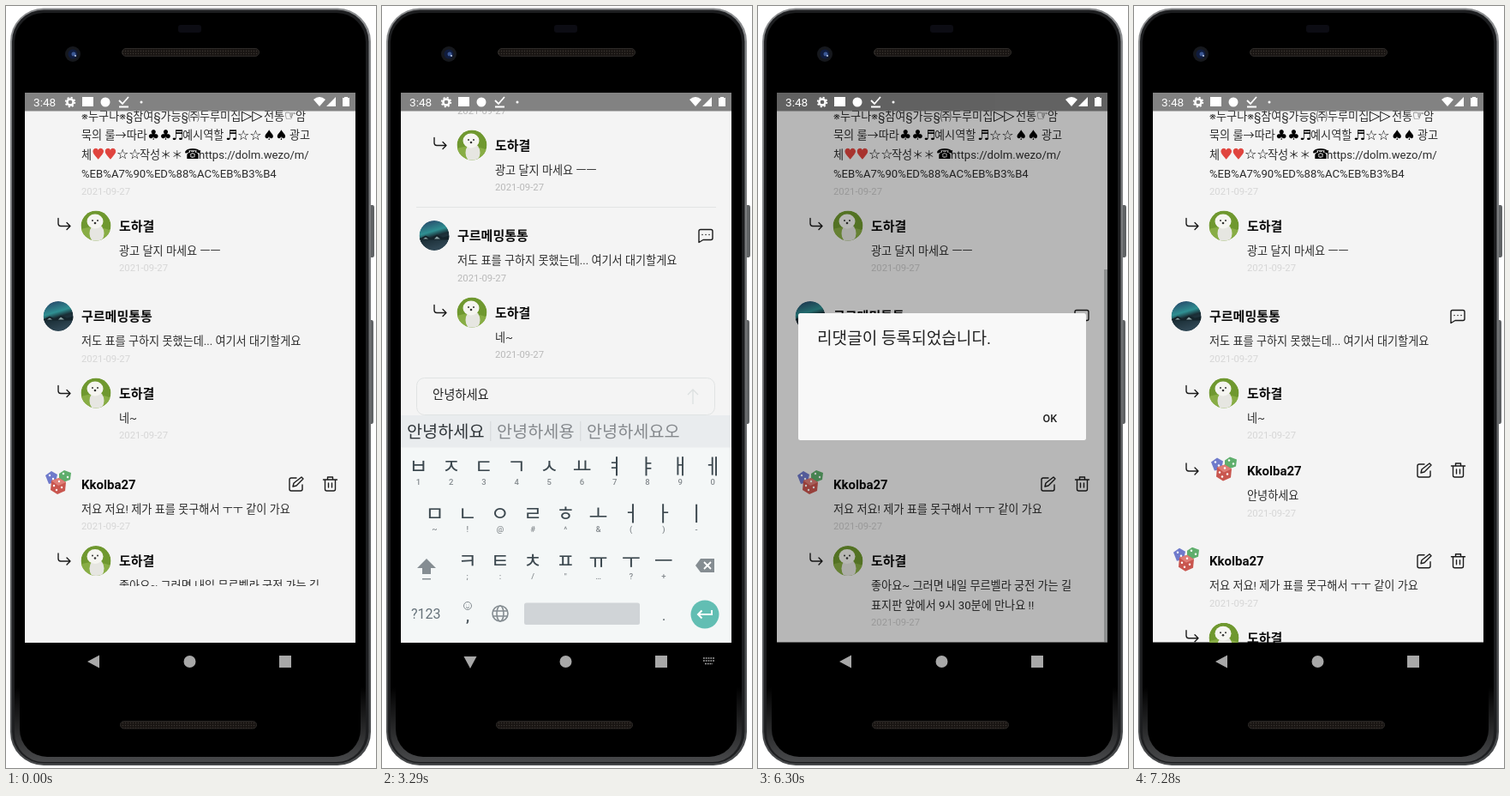
Animation, 432 px wide and 888 px high, one loop 7.49 s. Source, as an HTML page:

```html
<!DOCTYPE html>
<html lang="ko">
<head>
<meta charset="utf-8">
<title>Comment reply</title>
<style>
html, body { margin: 0; width: 100%; height: 100%; overflow: hidden; background: #fff; }
svg { display: block; width: 432px; height: 888px; font-family: Roboto, "Noto Sans CJK KR", "Noto Sans CJK", sans-serif; }
text { white-space: pre; }
.name { font-size: 15px; font-weight: 700; fill: #0b0b0b; }
.body { font-size: 13.15px; fill: #2c2c2c; }
.sym { font-size: 16px; font-family: "DejaVu Sans", "Noto Sans CJK KR", sans-serif; }
.date { font-size: 11.3px; fill: #b9b9b9; }
.line { stroke: #e2e4e4; }
.icon { fill: none; stroke: #1b1b1b; stroke-width: 1.4; stroke-linecap: round; stroke-linejoin: round; }
.bar { fill: #bcbebe; }
.key { font-size: 24px; fill: #3c484f; text-anchor: middle; }
.hint { font-size: 9.5px; font-weight: 500; fill: #858b8f; text-anchor: middle; }
.word { font-size: 19.7px; fill: #85898d; }
.typed { font-size: 14.3px; fill: #222; }
</style>
</head>
<body>
<svg viewBox="0 0 432 888">
  <defs>
    <linearGradient id="rim" x2="0" y2="1"><stop stop-color="#8b8d8f"/><stop offset=".5" stop-color="#6c6e70"/><stop offset="1" stop-color="#46484a"/></linearGradient>
    <linearGradient id="gloss" x2="0" y2="1"><stop offset=".9" stop-color="#000"/><stop offset="1" stop-color="#48494b"/></linearGradient>
    <linearGradient id="sky" x2=".3" y2="1"><stop stop-color="#263a62"/><stop offset=".45" stop-color="#2f9092"/><stop offset=".62" stop-color="#1a2d35"/><stop offset="1" stop-color="#2f4653"/></linearGradient>
    <clipPath id="screen"><path d="M22 101H408V741.500H22z"/></clipPath>
    <clipPath id="round"><circle r="17.5"/></clipPath>
    <pattern id="mesh" width="3" height="3" patternUnits="userSpaceOnUse"><rect width="3" height="3" fill="#191513"/><circle cx="1.5" cy="1.5" r=".7" fill="#3b3632"/></pattern>
    <g id="dog" clip-path="url(#round)">
      <circle r="17.5" fill="#6f982f"/><path d="M-18 4Q0-2 18 6V18H-18z" fill="#88ad45"/>
      <ellipse cx="1" cy="9" rx="8.5" ry="11" fill="#e6e6e1"/><ellipse cx="-1" cy="-5" rx="9.5" ry="8.5" fill="#f5f5f0"/>
      <g fill="#333"><circle cx="-4" cy="-6" r="1"/><circle cx="2" cy="-6" r="1"/><circle cx="-1" cy="-3" r="1.3"/></g>
    </g>
    <g id="lake" clip-path="url(#round)">
      <circle r="17.5" fill="url(#sky)"/><path d="M-18 4L-10 0-4 3 3-1 10 2 18 0V5H-18z" fill="#14242b"/>
      <path d="M-13 4l3-2 3 2zM0 4l3-3 4 3z" fill="#8fa5a7"/>
    </g>
    <g id="dice">
      <path d="M-15-10l7-5 7 4-2 9-8 2z" fill="#6f7acb"/><path d="M1-12l6-4 8 3-1 8-8 3-5-3z" fill="#5fae6c"/>
      <path d="M-8-4l9-3 8 5-1 10-9 4-8-5z" fill="#c9564f"/><path d="M-8-4l9-3 8 5-9 4z" fill="#de7e77"/>
      <g fill="#fff"><circle cx="-10" cy="-10" r="1.2"/><circle cx="-6" cy="-6" r="1.2"/><circle cx="6" cy="-12" r="1.2"/><circle cx="11" cy="-8" r="1.2"/><circle cx="1" cy="-3" r="1.2"/><circle cx="-5" cy="2" r="1.2"/><circle cx="-2" cy="7" r="1.2"/><circle cx="4" cy="4" r="1.2"/></g>
    </g>
    <path id="turn" class="icon" d="M1-8.500V-2.500Q1 .5 4 .5H15M11-3.500L15 .5 11 4.500"/>
    <path id="chat" class="icon" d="M-6-7H6Q8-7 8-5V3Q8 5 6 5H-3L-8 8V-5Q-8-7-6-7zM-4-1h.1M0-1h.1M4-1h.1"/>
    <path id="edit" class="icon" d="M0-7H-6Q-8-7-8-5V6Q-8 8-6 8H5Q7 8 7 6V1M6-8L8-6 0 2-4 3-3-1z"/>
    <path id="trash" class="icon" d="M-8-5H8M-3-5V-8H3V-5M-6-5V6Q-6 8-4 8H4Q6 8 6 6V-5M-2-1V4M2-1V4"/>
  </defs>

  <path d="M424 232h4q2 0 2 3v55q0 3-2 3h-4zM424 366h3q2 0 2 3v115q0 3-2 3h-3z" fill="#606365"/>
  <rect x="5" y="2.500" width="421" height="882.500" rx="39" fill="url(#rim)"/>
  <rect x="7" y="4.500" width="416.500" height="878" rx="37" fill="#1d1e20"/>
  <rect x="10" y="8" width="410" height="873" rx="34" fill="url(#gloss)"/>
  <rect x="16" y="700" width="398" height="175" rx="32"/>
  <rect x="201" y="22" width="27" height="9" rx="3" fill="#0c0c13"/>
  <circle cx="78" cy="56" r="9" fill="#16181d"/><circle cx="78" cy="56" r="5.5" fill="#101c3d"/><circle cx="79" cy="56" r="2.5" fill="#3b5793"/><circle cx="81" cy="58" r="1" fill="#c3d0ea"/>
  <rect x="135.500" y="49.500" width="160" height="9" rx="4.500" fill="url(#mesh)" stroke="#2c2927"/>
  <rect x="133.500" y="833.500" width="159" height="8.500" rx="4.200" fill="url(#mesh)" stroke="#2c2927"/>

  <g clip-path="url(#screen)">
    <path d="M22 101H408V742H22z" fill="#f4f4f4"/>
    <g id="list"></g>
    <g id="bars"><rect class="bar" x="404" y="255" width="4" height="131"/><rect class="bar" x="404" y="307" width="4" height="434"/><rect class="bar" x="404" y="290" width="4" height="394"/></g>
    <g id="footer">
      <path d="M22 412H408V742H22z" fill="#f4f4f4"/>
      <g id="field">
        <rect x="40.500" y="433.500" width="348" height="43" rx="9" fill="none" stroke="#e0e3e3"/>
        <path d="M363 464V447M357 453L363 447 369 453" fill="none" stroke="#dce0e0" stroke-width="1.300"/>
        <text id="hold" x="59" y="459" font-size="14.100" fill="#c3c7c8">Add Comment...</text>
        <g id="typed"></g>
      </g>
    </g>
    <path d="M22 101H408V122.500H22z" fill="#828282"/>
    <path id="dim" d="M22 101H408V742H22z"/>
    <g fill="#fff">
      <text x="32" y="117" font-size="13.600">3:48</text>
      <circle cx="75" cy="112" r="3.600" fill="none" stroke="#fff" stroke-width="2.500"/><circle cx="75" cy="112" r="5.400" fill="none" stroke="#fff" stroke-width="1.600" stroke-dasharray="2.100 2.141"/>
      <rect x="89" y="106" width="13" height="11"/><circle cx="116" cy="112" r="5.500"/>
      <path d="M132 110l4 4 7-8M132 117.500h11" fill="none" stroke="#fff" stroke-width="1.800"/><circle cx="158" cy="112" r="1.500"/>
      <path d="M359 109q7-6 14 0l-7 8zM385 106v11h-11zM393 107h2v-1h4v1h2v10h-8z"/>
    </g>
    <g id="dialog">
      <rect x="47" y="358" width="336" height="148" rx="2.500" fill="#f8f8f8"/>
      <text x="69" y="394" font-size="19.100" fill="#222">리댓글이 등록되었습니다.</text>
      <text x="332.500" y="484.500" font-size="12.500" font-weight="500" fill="#222">OK</text>
    </g>
  </g>

  <g id="board">
    <path d="M22 477H408V741H22z" fill="#f4f7f7"/>
    <g id="tabs">
      <path d="M102 477H408V514H102z" fill="#e9ecee"/>
      <text class="key" x="62" y="500" style="font-size:21px">ㅎ</text><path d="M62 501l2 5" stroke="#3c484f" stroke-width="2"/>
      <text x="131" y="503" font-size="20" fill="#78838a">En</text>
      <rect x="376.500" y="488" width="5" height="9" rx="2.500" fill="#858d92"/><path d="M373.500 495q0 5 5.500 5t5.500-5M379 500v4" fill="none" stroke="#858d92" stroke-width="1.500"/>
    </g>
    <g id="words"></g>
    <g id="keys"></g>
    <g fill="#858d92">
      <path d="M52 644L63 655H57V662H47V655H41zM47 667h10v1.500h-10z"/>
      <path d="M366 652l6-8h16v16h-16z"/><path d="M376 648l8 8m0-8l-8 8" stroke="#fff" stroke-width="1.800"/>
      <text x="34" y="714" font-size="16" fill="#66727a">?123</text>
      <circle cx="100" cy="699" r="4.500" fill="none" stroke="#858d92"/><path d="M98 700.500q2 2 4 0M98 698h.6M101.500 698h.6" fill="none" stroke="#858d92"/>
      <text x="98" y="717" font-size="17" font-weight="700" fill="#4b565c">,</text>
      <g fill="none" stroke="#858d92" stroke-width="1.600"><circle cx="138" cy="708" r="9"/><ellipse cx="138" cy="708" rx="4" ry="9"/><path d="M129.500 705h17M129.500 711h17"/></g>
      <rect x="166" y="695.500" width="135" height="25.500" rx="2.500" fill="#d0d4d7"/>
      <text x="327" y="716" font-size="16" fill="#4b565c">.</text>
      <circle cx="377" cy="709" r="16.500" fill="#62beb3"/><path d="M385 704v5h-16m4.500-4.500l-4.500 4.500 4.500 4.500" fill="none" stroke="#fff" stroke-width="2"/>
    </g>
  </g>
  <g fill="#a8a8a8">
    <g transform="translate(103 764)"><path id="back" d="M-8 0L6-7.500V7.500z"/></g>
    <circle cx="214.500" cy="764" r="7"/><rect x="319" y="757" width="14" height="14"/>
    <path id="kbd" d="M375 760h13M375 763h13M377 766.500h9" stroke="#a8a8a8" stroke-width="1.600" stroke-dasharray="1.800 1"/>
  </g>
</svg>
<script>
const LOOP = 7490;
const $ = id => document.getElementById(id);

// Holds each value until the next [ms, value] step.
function track(el, prop, steps) {
  const frames = steps.map(([t, v]) => ({ offset: t / LOOP, [prop]: v, easing: 'steps(1)' }));
  frames.push({ offset: 1, [prop]: steps.at(-1)[1] });
  el.animate(frames, { duration: LOOP, iterations: Infinity });
}
const fade = (el, ...steps) => track(el, 'opacity', [[0, 0], ...steps]);
const slide = (el, ...steps) =>
  track(el, 'transform', [[0, 0], ...steps].map(([t, y]) => [t, `translate(0px, ${y}px)`]));

const text = (cls, x, y, s) => `<text class="${cls}" x="${x}" y="${y}">${s}</text>`;
const use = (id, x, y) => `<use href="#${id}" x="${x}" y="${y}"/>`;
const line = y => `<path class="line" d="M40 ${y}H390"/>`;
const tools = y => use('edit', 339, y) + use('trash', 378.5, y);

function row(y, name, pic, lines, reply = true) {
  const x = reply ? 132 : 88;
  return (reply ? use('turn', 60, y) : '') + use(pic, reply ? 105 : 61, y) +
    text('name', x, y + 5.5, name) +
    lines.map((s, i) => text('body', x, y + 33.5 + i * 22.7, s)).join('') +
    text('date', x, y + 53 + (lines.length - 1) * 22.7, '2021-09-27');
}

const host = '도하결', guest = '구르메밍통통', me = 'Kkolba27';
const bits = (y, parts) => parts.map(([x, s, sym]) => text(sym ? 'sym' : 'body', x, y + (sym ? .5 : 0), s)).join('');

$('list').innerHTML =
  bits(132.5, [[88, '※누구나※§참여§가능§㈜두루미집'], [275, '▷▷', 1], [301, '전통'], [325, '☞', 1], [338, '암']]) +
  bits(155, [[88, '묵의 룰→따라'], [165, '♣♣', 1], [193, '♬', 1], [206, '예시역할'], [256, '♬', 1], [270, '☆☆', 1], [300, '♠♠', 1], [331, '광고']]) +
  bits(177.5, [[88, '체'], [129, '☆☆', 1], [156, '작성'], [180, '＊＊'], [208, '☎', 1], [225, 'https://dolm.wezo/m/']]) +
  '<g fill="#e0443e" stroke="#e0443e">' + text('sym', 100.5, 178, '♥♥') + '</g>' +
  text('body', 88, 200, '%EB%A7%90%ED%88%AC%EB%B3%B4') +
  text('date', 88, 219.5, '2021-09-27') +
  row(256, host, 'dog', ['광고 달지 마세요 ㅡㅡ']) + line(328.5) +
  row(361.5, guest, 'lake', ['저도 표를 구하지 못했는데... 여기서 대기할게요'], false) +
  `<g id="ask">${use('chat', 378, 361.5)}</g>` +
  row(451, host, 'dog', ['네~']) +
  `<g id="fresh">${row(541.5, me, 'dice', ['안녕하세요'])}${tools(541)}</g>` +
  `<g id="tail">${line(523.5)}${row(557, me, 'dice', ['저요 저요! 제가 표를 못구해서 ㅜㅜ 같이 가요'], false)}${tools(557)}` +
  row(646.5, host, 'dog', ['좋아요~ 그러면 내일 무르벨라 궁전 가는 길', '표지판 앞에서 9시 30분에 만나요 !!']) + '</g>';

const keyRow = (x, y, glyphs, hints) => [...glyphs].map((g, i) =>
  text('key', x + i * 38.2, y + 8.5, g) + text('hint', x + i * 38.2, y + 22, hints[i])).join('');
$('keys').innerHTML =
  keyRow(42.5, 536, 'ㅂㅈㄷㄱㅅㅛㅕㅑㅐㅔ', '1234567890') +
  keyRow(61.5, 591, 'ㅁㄴㅇㄹㅎㅗㅓㅏㅣ', '~!@#^&()-') +
  keyRow(99.7, 646, 'ㅋㅌㅊㅍㅠㅜㅡ', ';:/"…?+');

const typing = [
  [1400, 'ㅇ', 'ㅇㅇ', '응'], [1540, '아', '아니', '아직'], [1680, '안', '안녕', '안돼'],
  [1820, '안ㄴ', '안녕', '안나'], [1890, '안녀', '안녕', '안녕하세요'], [2030, '안녕', '안녕하세요', '안녕히'],
  [2170, '안녕ㅎ', '안녕하세요', '안녕히'], [2240, '안녕하', '안녕하세요', '안녕하십니까'],
  [2380, '안녕핫', '안녕하세요', '안녕하십니까'], [2450, '안녕하세', '안녕하세요', '안녕하세용'],
  [2520, '안녕하셍', '안녕하세요', '안녕하세용'], [2660, '안녕하세요', '안녕하세용', '안녕하세요오'],
];

function wordBar(words, full) {
  const pad = full ? 7.2 : 14.2;
  let x = full ? 29 : 37, out = '<path d="M22 477H408V514.5H22z" fill="#e9ecee"/>';
  words.forEach((w, i) => {
    out += `<text class="word" x="${x}" y="503"${i ? '' : ' style="fill:#30363a"'}>${w}</text>`;
    x += w.length * 18.12 + pad;
    if (i < 2 || !full) out += `<path d="M${x} 484V507" stroke="#d3d7d9"/>`;
    x += pad;
  });
  return out + (full ? '' : '<path d="M380 493.500l5 5 5-5" fill="none" stroke="#78838a" stroke-width="1.800"/>');
}

const caret = n => `<path class="caret" d="M${60 + n * 13.15} 443V463" stroke="#3f9c8e" stroke-width="2"/>`;
$('typed').innerHTML = caret(0) + typing.map(([, s]) => `<g>${text('typed', 59, 458, s)}${caret(s.length)}</g>`).join('');
$('words').innerHTML = typing.map(([, ...w], i) => `<g>${wordBar(w, i === typing.length - 1)}</g>`).join('');
typing.forEach(([t], i) => {
  const end = typing[i + 1]?.[0] ?? 4830;
  for (const el of [$('typed').children[i + 1], $('words').children[i]]) fade(el, [t, 1], [end, 0]);
});
const carets = document.querySelectorAll('.caret');
fade(carets[0], [770, 1], [1260, 0]);
fade(carets[typing.length], [2660, 1], [3220, 0], [3780, 1], [4270, 0]);
track($('hold'), 'opacity', [[0, 1], [1400, 0]]);
track($('tabs'), 'opacity', [[0, 1], [1400, 0]]);

// List, field and scrollbars
slide($('list'), [840, -20], [910, -55], [980, -82], [1050, -94], [4830, 0]);
slide($('tail'), [6440, 89.7]);
fade($('fresh'), [6440, 1]);
fade($('ask'), [140, .5], [210, 1]);
fade($('field'), [140, .4], [210, .7], [280, 1]);
track($('footer'), 'transform', [[0, 264], [770, 0], [4830, 400]].map(([t, y]) => [t, `translate(0px, ${y}px)`]));
const [barA, barB, barC] = $('bars').children;
fade(barA, [840, 1], [1400, .4], [1470, 0]);
fade(barB, [4830, 1], [5460, .5], [5530, 0], [6160, 1], [6440, 0]);
fade(barC, [6440, 1], [7070, .75], [7140, .45], [7210, .2], [7280, 0]);
document.querySelectorAll('.line').forEach(el => fade(el, [280, 1], [4830, 0], [6440, 1], [6860, 0]));
document.querySelectorAll('.date').forEach(el =>
  track(el, 'opacity', [[0, .5], [280, 1], [4830, .7], [6440, 1], [6860, .5]]));

// Keyboard and navigation
slide($('board'), [700, 25], [770, 10], [840, 0], [4550, 3], [4620, 10], [4690, 20], [4760, 30]);
fade($('board'), [700, .3], [770, .78], [840, 1], [4550, .95], [4620, .78], [4690, .5], [4760, .2], [4830, 0]);
track($('back'), 'transform', [[0, 0], [700, -20], [770, -45], [840, -72], [910, -90],
  [4550, -70], [4620, -42], [4690, -20], [4760, -6], [4830, 0]].map(([t, a]) => [t, `rotate(${a}deg)`]));
fade($('kbd'), [770, 1], [4550, 0]);

// Alert
fade($('dim'), [6160, .12], [6230, .2], [6300, .25], [6370, .28], [6580, 0]);
fade($('dialog'), [6160, .5], [6230, 1], [6440, .65], [6510, .25], [6580, 0]);
</script>
</body>
</html>
```
